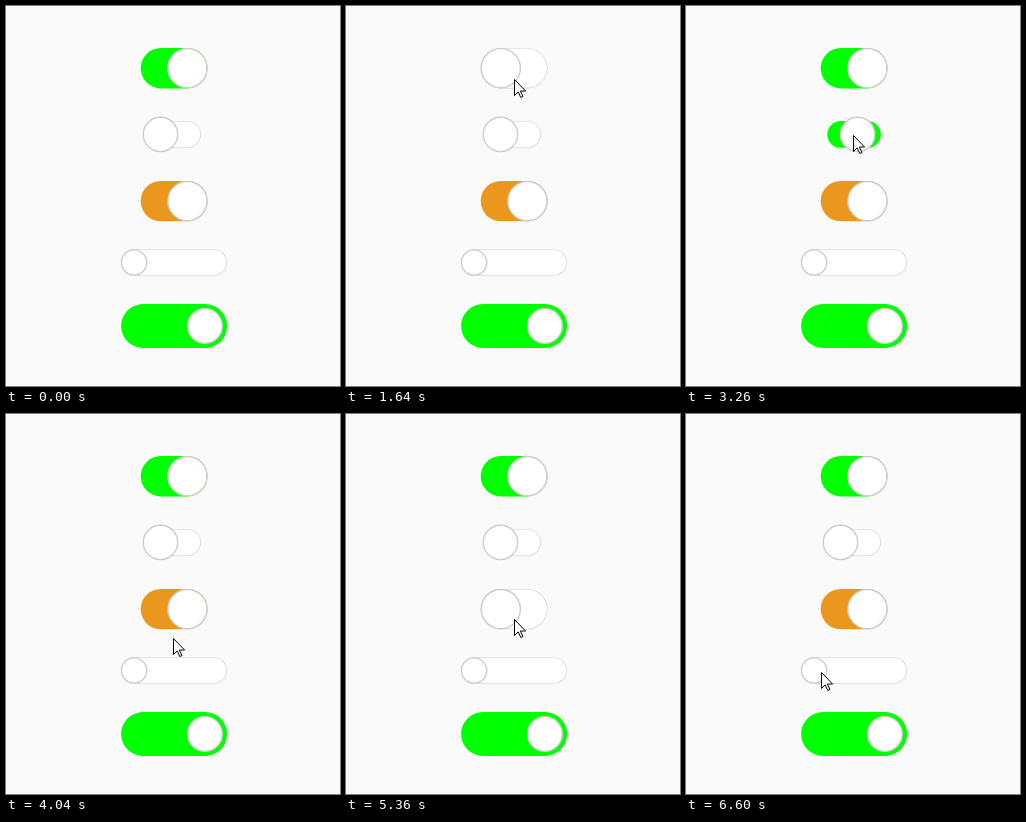
Animation of 334 by 380 pixels, one loop 7.06 s. Source, as an HTML page:

```html
<!DOCTYPE html>
<html lang="en">
<head>
<meta charset="utf-8">
<title>Toggle switches</title>
<style>
  html, body { margin: 0; width: 100%; height: 100%; overflow: hidden; background: #fafafa; }
  svg { display: block; width: 100%; height: 100%; }
</style>
</head>
<body>
<svg id="stage" viewBox="0 0 334 380"></svg>
<script>
const LOOP = 7060, STEP = 77.5, FIRST = 320;
const FLIP = 310, GLIDE = 470;
const CENTER = 168.1, BORDER = 0.6;
const GREY = '#ccc', GREEN = '#00ff00', ORANGE = '#eb961d';
const stage = document.getElementById('stage');

const clamp = v => Math.max(0, Math.min(1, v));
const mix = (a, b, p) => a + (b - a) * p;
const easeIn = p => p ** 1.8;
const easeOut = p => 1 - (1 - p) ** 3;

function set(el, attrs) {
  for (const key in attrs) el.setAttribute(key, attrs[key]);
}

function add(tag, attrs) {
  const el = document.createElementNS('http://www.w3.org/2000/svg', tag);
  set(el, attrs);
  return stage.appendChild(el);
}

// A pill of the given size, centred in its row.
function pill(el, cy, w, h, fill) {
  set(el, { x: CENTER - w / 2, y: cy - h / 2, width: w, height: h, rx: h / 2, fill });
}

// Each click flips the switch to its other state.
class Switch {
  constructor(cy, w, h, r, travel, color, state, clicks = []) {
    Object.assign(this, { cy, w, h, travel, color, state, clicks });
    this.base = add('rect', {});
    this.inner = add('rect', {});
    this.knob = add('circle', { cy, r, fill: '#fff', stroke: GREY, 'stroke-width': 1.4 });
  }

  draw(t) {
    let on = this.state, pos = on;
    for (const start of this.clicks.filter(c => c <= t)) {
      on = 1 - on;
      pos = mix(1 - on, on, easeIn(clamp((t - start) / FLIP)));
    }
    const scale = 1 - pos;
    pill(this.base, this.cy, this.w, this.h, on ? this.color : GREY);
    pill(this.inner, this.cy, (this.w - 2 * BORDER) * scale, (this.h - 2 * BORDER) * scale, '#fff');
    set(this.knob, { cx: CENTER + mix(-this.travel, this.travel, pos) });
  }
}

const switches = [
  new Switch(62.2, 66.8, 40.4, 19.6, 13.3, GREEN, 1, [1252, 1990]),
  new Switch(128.4, 53.6, 26.8, 17.2, 13.6, GREEN, 0, [3025, 3640]),
  new Switch(195.1, 66.8, 40.4, 19.6, 13.3, ORANGE, 1, [4965, 5900]),
  new Switch(256.5, 105.8, 26.2, 12.6, 40, GREEN, 0),
  new Switch(320, 106, 44, 17.4, 30.8, GREEN, 1)
];

const cursor = add('path', {
  d: 'M.5 .5V16.5L4.2 12.9 6.8 18.5 9 17.5 6.4 12H11.6Z',
  fill: '#fff', stroke: '#000', 'stroke-width': 1
});

// Places the pointer glides to, with the time of arrival.
const stops = [
  { at: 0, x: 110, y: 240 },
  { at: 780, x: 168, y: 73 },
  { at: 2570, x: 167, y: 129 },
  { at: 4110, x: 167, y: 224 },
  { at: 4580, x: 168, y: 205 },
  { at: 6610, x: 135, y: 258 }
];

function drawCursor(t) {
  let { x, y } = stops[0];
  for (const stop of stops) {
    const p = easeOut(clamp(1 + (t - stop.at) / GLIDE));
    x = mix(x, stop.x, p);
    y = mix(y, stop.y, p);
  }
  set(cursor, {
    transform: `translate(${Math.round(x)} ${Math.round(y)})`,
    visibility: t < FIRST ? 'hidden' : 'visible'
  });
}

function draw(time) {
  const t = FIRST + STEP * Math.floor((time % LOOP - FIRST + 12) / STEP);
  for (const s of switches) s.draw(t);
  drawCursor(t);
}

const origin = performance.now();
function tick() {
  draw(performance.now() - origin);
  requestAnimationFrame(tick);
}
draw(0);
requestAnimationFrame(tick);
</script>
</body>
</html>
```
